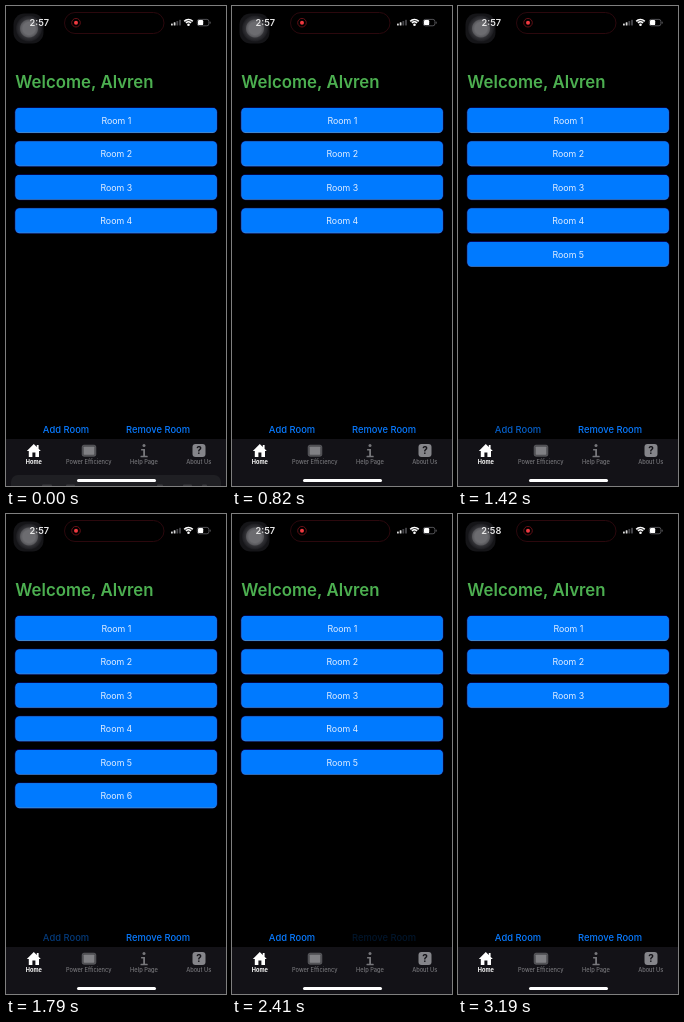
Write an HTML page with a canvas that moves like this. It is 220 px wide and 480 px high and loops after 3.29 s.

```html
<!DOCTYPE html>
<html lang="en">
<head>
<meta charset="utf-8">
<title>Rooms</title>
<style>
  html, body { margin: 0; width: 100%; height: 100%; overflow: hidden; background: #000; }
  canvas { display: block; width: 220px; height: 480px; }
</style>
</head>
<body>
<canvas id="stage"></canvas>
<script>
const W = 220, H = 480, LOOP = 3290;
const FONT = 'Inter, sans-serif';
const BLUE = '#007aff', GRAY = '#77777b', BAR = '#131217';

const canvas = document.getElementById('stage');
const ctx = canvas.getContext('2d');
const dpr = window.devicePixelRatio || 1;
canvas.width = W * dpr;
canvas.height = H * dpr;
ctx.scale(dpr, dpr);

// [time, number of rooms]
const ROOMS = [[0, 4], [1200, 5], [1690, 6], [2350, 5], [2720, 4], [3090, 3]];
// [press, release, fade-back length]
const ADD_TAPS = [[1020, 1200, 300], [1520, 1680, 300]];
const REMOVE_TAPS = [[2250, 2430, 300], [2640, 3040, 150]];

const clamp = v => Math.min(1, Math.max(0, v));
const ease = v => v * v * (3 - 2 * v);

function roomsAt(t) {
  return ROOMS.filter(([start]) => t >= start).pop()[1];
}

function tapAlpha(t, taps) {
  const tap = taps.filter(([press]) => t >= press).pop();
  if (!tap) return 1;
  const [press, release, fade] = tap;
  return t < release
    ? 1 - 0.83 * clamp((t - press) / 50)
    : 0.17 + 0.83 * clamp((t - release) / fade);
}

function box(x, y, w, h, r, fill, stroke, line = 1) {
  ctx.beginPath();
  ctx.roundRect(x, y, w, h, r);
  if (fill) { ctx.fillStyle = fill; ctx.fill(); }
  if (stroke) { ctx.strokeStyle = stroke; ctx.lineWidth = line; ctx.stroke(); }
}

function disc(x, y, r, fill) {
  ctx.beginPath();
  ctx.arc(x, y, r, 0, Math.PI * 2);
  ctx.fillStyle = fill;
  ctx.fill();
}

function text(str, x, y, size, color, weight = 400, align = 'center') {
  ctx.font = `${weight} ${size}px ${FONT}`;
  ctx.textAlign = align;
  ctx.fillStyle = color;
  ctx.fillText(str, x, y);
}

function polygon(points, fill) {
  ctx.beginPath();
  points.forEach(([x, y]) => ctx.lineTo(x, y));
  ctx.closePath();
  ctx.fillStyle = fill;
  ctx.fill();
}

function drawTouchButton() {
  box(7.5, 7.5, 30, 30, 11, '#151518');
  const glow = ctx.createRadialGradient(23, 22.5, 6, 23, 22.5, 13);
  glow.addColorStop(0, '#6c6c70');
  glow.addColorStop(0.35, '#58585c');
  glow.addColorStop(0.5, '#323236');
  glow.addColorStop(1, '#1c1c20');
  disc(23, 22.5, 13, glow);
}

function drawStatus(t) {
  drawTouchButton();
  text(t < 2620 ? '2:57' : '2:58', 33.3, 20, 9.2, '#e6e6e6', 600);

  box(58.5, 6.5, 99.5, 21, 10.5, '#000', '#2b080d');
  ctx.beginPath();
  ctx.arc(70, 16.7, 4.3, 0, Math.PI * 2);
  ctx.strokeStyle = '#6d1219';
  ctx.lineWidth = 0.9;
  ctx.stroke();
  disc(70, 16.7, 2, '#f03a40');

  for (let i = 0; i < 4; i++) {
    const h = 2 + i * 1.3;
    box(165 + i * 2.7, 19.6 - h, 1.8, h, 0.5, i < 2 ? '#d8d8d8' : '#48484c');
  }

  ctx.strokeStyle = '#fff';
  ctx.lineWidth = 1.7;
  for (const r of [3.4, 5.8]) {
    ctx.beginPath();
    ctx.arc(182.5, 19.3, r, -Math.PI * 0.76, -Math.PI * 0.24);
    ctx.stroke();
  }
  disc(182.5, 18.8, 1.3, '#fff');

  box(191.3, 13.4, 11.6, 6.4, 2, null, '#68686c', 0.8);
  box(192, 14.1, 5.2, 5, 1.2, '#fff');
  box(203.7, 15.5, 0.9, 2.2, 0.4, '#68686c');
}

function drawRooms(count) {
  for (let i = 0; i < count; i++) {
    const y = 101.7 + i * 33.45;
    box(8.6, y - 0.4, 203, 26, 5, '#06085c');
    box(9.4, y + 0.4, 201.4, 24.8, 4.2, '#3f86cc');
    box(9.6, y + 0.4, 201, 24, 4, BLUE);
    text(`Room ${i + 1}`, 110.3, y + 16.1, 8.8, '#e2eeff');
  }
}

function drawAction(label, x, alpha) {
  ctx.globalAlpha = alpha;
  text(label, x, 427.1, 9.4, '#087aff', 500);
  ctx.globalAlpha = 1;
}

function drawTabs() {
  box(0, 433, W, 47, 0, BAR);

  polygon([[20.8, 445], [27.8, 438], [30.8, 441], [30.8, 439], [32.6, 439],
           [32.6, 442.8], [34.8, 445], [33, 445], [33, 451], [29.4, 451],
           [29.4, 446.6], [26.4, 446.6], [26.4, 451], [22.8, 451], [22.8, 445]], '#fff');

  box(76.2, 439.2, 13.6, 11, 1.8, '#4c4c50', '#68686c', 0.7);
  box(77.7, 440.7, 10.6, 8, 0.6, '#808084');

  disc(138, 439.5, 1.5, GRAY);
  box(135, 443, 4, 1.5, 0.4, GRAY);
  box(137.2, 443, 1.8, 7.5, 0.4, GRAY);
  box(134.5, 449.8, 7.2, 1.5, 0.4, GRAY);

  box(186.5, 438, 13, 13, 3, '#85858a');
  text('?', 193, 448.2, 10, BAR, 700);

  text('Home', 27.8, 458, 5.6, '#fff', 700);
  text('Power Efficiency', 82.7, 458, 5.7, GRAY, 500);
  text('Help Page', 138, 458, 5.7, GRAY, 500);
  text('About Us', 192.7, 458, 5.7, GRAY, 500);
}

function drawSheet(t) {
  const drop = 14 * ease(clamp((t - 80) / 200));
  if (drop >= 13) return;
  const y = 469 + drop;
  box(5, y, 210, 24, 7, '#1f1f23');
  [[36, 10], [60, 9], [151, 6], [177, 9], [196, 5]].forEach(([x, w]) =>
    box(x, y + 9.5, w, 3, 1, '#3a3a3e'));
}

function draw(t) {
  ctx.fillStyle = '#000';
  ctx.fillRect(0, 0, W, H);
  drawStatus(t);
  text('Welcome, Alvren', 9.3, 82.3, 16.8, '#4caf50', 600, 'left');
  drawRooms(roomsAt(t));
  drawAction('Add Room', 60, tapAlpha(t, ADD_TAPS));
  drawAction('Remove Room', 152, tapAlpha(t, REMOVE_TAPS));
  drawTabs();
  drawSheet(t);
  box(71, 473, 79, 3, 1.5, '#fff');
}

const start = performance.now();
function tick() {
  draw((performance.now() - start) % LOOP);
  requestAnimationFrame(tick);
}
tick();
</script>
</body>
</html>
```
